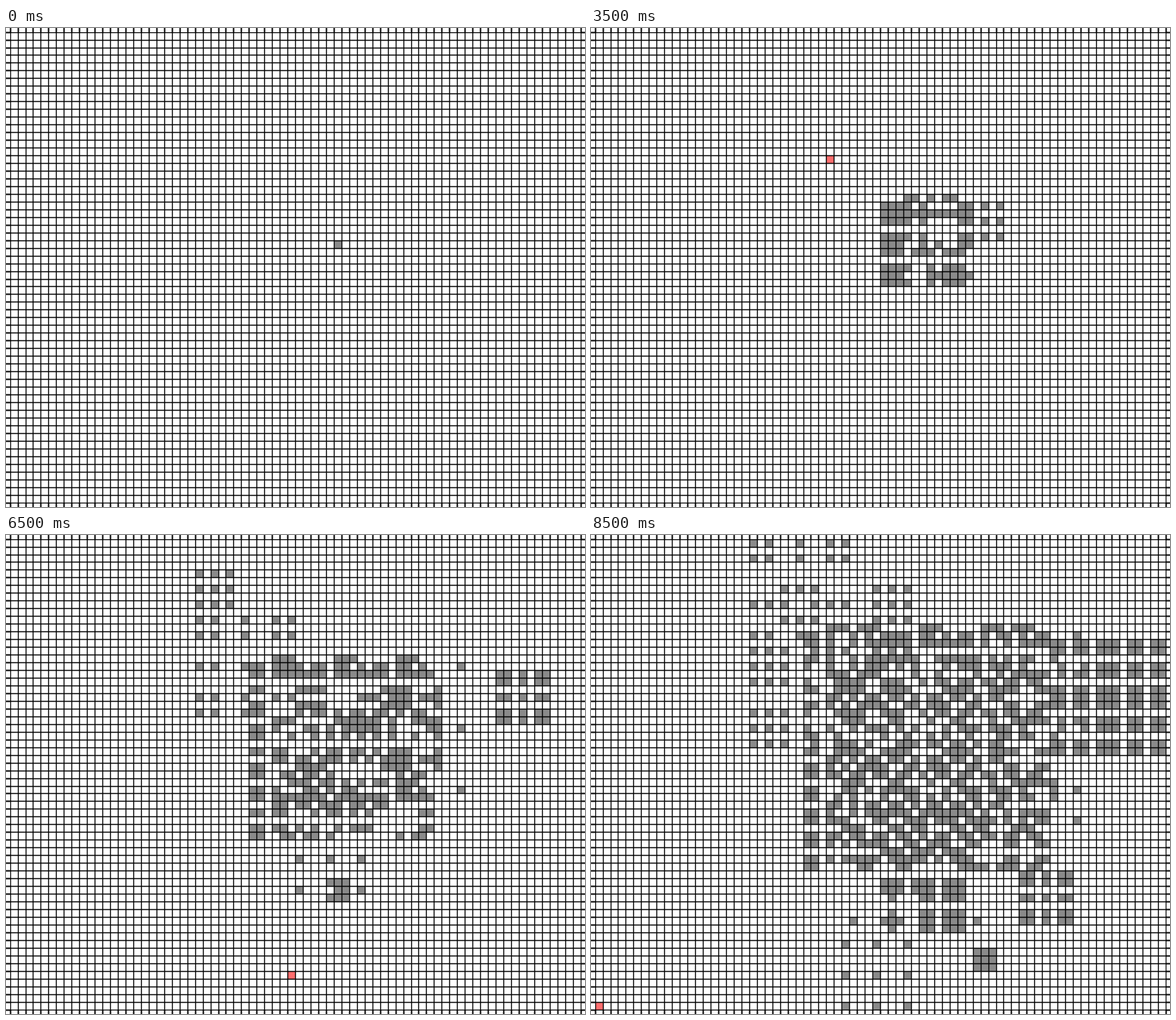
Animation, 823 px wide and 681 px high, one loop 10000 ms. Source, as an HTML page with a canvas:

```html
<!DOCTYPE html>
<html lang="en">
<head>
<meta charset="utf-8">
<title>Parity automaton</title>
<style>
  html, body { margin: 0; width: 100%; height: 100%; overflow: hidden; background: #fff; }
  canvas { display: block; }
</style>
</head>
<body>
<canvas id="stage" width="823" height="681"></canvas>
<script>
const ctx = document.getElementById('stage').getContext('2d');
const W = 823, H = 681, COLS = 74, ROWS = 61;
const LOOP = 10000, STEP = 500, HOLD = 1000;
const GRAY = '#8a8a8a', RED = '#ff6e6e', GREEN = '#6eff6e';

// Cell flipped at each step; the first one is the starting cell.
const flips = [
  [42, 27], [44, 27], [43, 24], [50, 24], [41, 31], [30, 16], [50, 24], [41, 41],
  [66, 20], [26, 6], [42, 45], [36, 56], [58, 46], [39, 48], [50, 54], [0, 60]
];

const lineX = k => Math.round(5.6 + 10.96 * k);
const lineY = k => Math.round(5.58 + 10.967 * k);

const isOn = (grid, x, y) =>
  x >= 0 && y >= 0 && x < COLS && y < ROWS ? grid[y * COLS + x] : 0;

// Each cell becomes the parity of its 3 by 3 block.
function evolve(grid) {
  return grid.map((_, i) => {
    const x = i % COLS, y = Math.floor(i / COLS);
    let sum = 0;
    for (let dy = -1; dy <= 1; dy++)
      for (let dx = -1; dx <= 1; dx++) sum += isOn(grid, x + dx, y + dy);
    return sum % 2;
  });
}

function buildStates() {
  let grid = new Uint8Array(COLS * ROWS);
  return flips.map(([x, y], step) => {
    grid = evolve(grid);
    const i = y * COLS + x;
    grid[i] ^= 1;
    const mark = step === 0 ? GRAY : grid[i] ? RED : GREEN;
    return { grid, x, y, mark };
  });
}

function fillCell(x, y, color) {
  ctx.fillStyle = color;
  ctx.fillRect(lineX(x), lineY(y), lineX(x + 1) - lineX(x) + 1, lineY(y + 1) - lineY(y) + 1);
}

function strokeLines(width) {
  ctx.lineWidth = width;
  ctx.beginPath();
  for (let k = 0; k <= COLS; k++) {
    ctx.moveTo(lineX(k) + 0.5, 0);
    ctx.lineTo(lineX(k) + 0.5, H);
  }
  for (let k = 0; k <= ROWS; k++) {
    ctx.moveTo(0, lineY(k) + 0.5);
    ctx.lineTo(W, lineY(k) + 0.5);
  }
  ctx.stroke();
}

function drawGrid() {
  const left = lineX(0), top = lineY(0), right = lineX(COLS) + 1, bottom = lineY(ROWS) + 1;
  ctx.strokeStyle = '#000';
  ctx.save();
  ctx.beginPath();
  ctx.rect(left, top, right - left, bottom - top);
  ctx.clip();
  strokeLines(1.4);
  ctx.restore();

  // Heavier ticks in the margin, with the corners left open.
  ctx.save();
  ctx.beginPath();
  ctx.rect(left - 1, 0, right - left + 2, top);
  ctx.rect(left - 1, bottom, right - left + 2, H - bottom);
  ctx.rect(0, top - 1, left, bottom - top + 2);
  ctx.rect(right, top - 1, W - right, bottom - top + 2);
  ctx.clip();
  ctx.lineWidth = 2;
  ctx.beginPath();
  for (let k = 0; k <= COLS; k++)
    for (const [a, b] of [[0, top], [bottom, H]]) {
      ctx.moveTo(lineX(k) + 0.5, a);
      ctx.lineTo(lineX(k) + 0.5, b);
    }
  for (let k = 0; k <= ROWS; k++)
    for (const [a, b] of [[0, left], [right, W]]) {
      ctx.moveTo(a, lineY(k) + 0.5);
      ctx.lineTo(b, lineY(k) + 0.5);
    }
  ctx.stroke();
  ctx.restore();
}

function draw({ grid, x, y, mark }) {
  ctx.fillStyle = '#fff';
  ctx.fillRect(0, 0, W, H);
  grid.forEach((on, i) => {
    if (on) fillCell(i % COLS, Math.floor(i / COLS), GRAY);
  });
  fillCell(x, y, mark);
  drawGrid();
}

const states = buildStates();
let shown = -1;

function tick() {
  const t = performance.now() % LOOP;
  const step = Math.max(0, Math.min(states.length - 1, Math.floor((t - HOLD) / STEP)));
  if (step !== shown) draw(states[shown = step]);
  requestAnimationFrame(tick);
}
tick();
</script>
</body>
</html>
```
